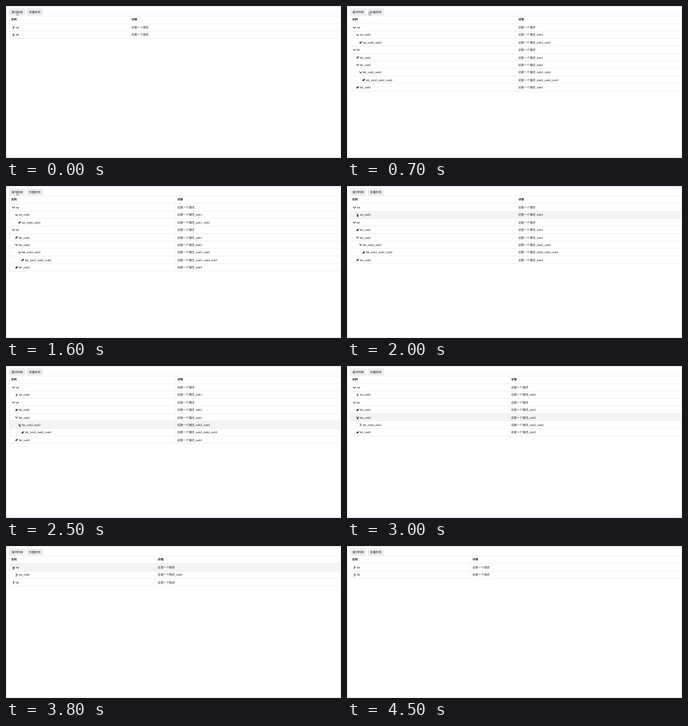
Write an HTML page that moves like this. It is 419x190 px and loops after 4.6 s.

```html
<!DOCTYPE html>
<html lang="zh-CN">
<head>
<meta charset="utf-8">
<style>
html, body { margin: 0; width: 100%; height: 100%; overflow: hidden; background: #fff; }
svg { display: block; width: 100%; height: 100%; }
text { font: 14px "Liberation Sans", "Noto Sans CJK SC", "Noto Sans CJK", sans-serif; fill: #1a1a1a; text-rendering: geometricPrecision; }
.head { font-weight: bold; }
</style>
</head>
<body>
<svg id="stage" viewBox="0 0 419 190" preserveAspectRatio="none"></svg>
<script>
const LOOP = 4600, STEP = 100;
const LEFT = 4, WIDTH = 414.5, HEAD = 12.2, TOP = 21.9, ROW = 9.36, INDENT = 3.8;
const DESC = '这是一个描述';
const NODES = ['aa', 'aa_sub1', 'aa_sub1_sub2', 'bb', 'bb_sub1', 'bb_sub2',
  'bb_sub2_sub2', 'bb_sub2_sub2_sub2', 'bb_sub3'];
const PARENTS = NODES.filter(n => NODES.some(m => m.startsWith(n + '_')));
const SPOTS = { expand: [13.8, 7.8], collapse: [32.8, 7.8], leave: [430, 200] };

// What the cursor does, and when; a node name closes that node.
const CLICKS = [
  [100, 'expand'], [1000, 'collapse'], [1500, 'expand'],
  [1900, 'aa_sub1'], [2600, 'bb_sub2_sub2'], [3100, 'bb_sub2'],
  [3400, 'bb'], [3900, 'aa'], [4500, 'leave']
];

const stage = document.getElementById('stage');
const depth = n => n.split('_').length - 1;
const rowsOf = open => NODES.filter(n => PARENTS.every(p => !n.startsWith(p + '_') || open.has(p)));

function openAt(t) {
  let open = new Set();
  for (const [time, action] of CLICKS) {
    if (time > t) break;
    if (action === 'expand') open = new Set(PARENTS);
    else if (action === 'collapse') open.clear();
    else open.delete(action);
  }
  return open;
}

function spot([time, action]) {
  if (SPOTS[action]) return SPOTS[action];
  const row = rowsOf(openAt(time)).indexOf(action);
  return [8.5 + depth(action) * INDENT, TOP + (row + .4) * ROW];
}

// Rest after a click, glide to the next place, rest again.
function cursorAt(t) {
  const i = CLICKS.findIndex(c => c[0] > t);
  if (i < 0) return SPOTS.leave;
  const to = CLICKS[i], from = CLICKS[i - 1] || [0, 'expand'];
  const part = (t - from[0]) / (to[0] - from[0]);
  const k = Math.min(1, Math.max(0, (part - .4) / .4)), ease = k * k * (3 - 2 * k);
  const a = spot(from), b = spot(to);
  return a.map((v, j) => v + (b[j] - v) * ease);
}

// Columns share the table width in proportion to their widest content.
function columnX(level) {
  const name = 58.7 + 53.2 * level, desc = 103 + 38.1 * level;
  return LEFT + 2.5 + WIDTH * name / (name + desc);
}

const rect = (x, y, w, h, fill, extra = '') =>
  `<rect x="${x}" y="${y}" width="${w}" height="${h}" fill="${fill}" ${extra}/>`;
const line = (x, y, w, h) => rect(x, y, w, h, '#e9e9e9');
const rule = y => line(LEFT, y - .25, WIDTH, .5);
const label = (x, y, s, cls = '') =>
  `<text class="${cls}" transform="translate(${x} ${y + 1.25}) scale(.2536)">${s}</text>`;
const shape = (x, y, d, style) => `<path transform="translate(${x} ${y})" d="${d}" ${style}/>`;
const button = (x, s) => rect(x, 3.1, 20.2, 8.6, '#eee', 'rx=".6"') + label(x + 3, 7.6, s);

function icon(x, y, node, open) {
  const d = !PARENTS.includes(node) ? 'M-1.3 1.2L1.1-1.2M-.6 1.3L1.4-.6M-1.2 .2L-.2-.8'
    : open.has(node) ? 'M-1.6-.8L0 .7L1.6-.8' : 'M-.8-1.6L.7 0L-.8 1.6';
  return shape(x, y, d, 'fill="none" stroke="#1a1a1a" stroke-width="1"');
}

function cursor(x, y, hand) {
  return hand
    ? shape(x, y, 'M-.2 0H.5V1.3L2 1.8V3L1.6 4H0L-.9 2.5L-.2 2.3Z',
        'fill="#fff" stroke="#333" stroke-width=".4"')
    : shape(x, y, 'M0 0V3.6L.8 2.9L1.4 4.2L2 3.9L1.5 2.7H2.5Z',
        'fill="#111" stroke="#fff" stroke-width=".3"');
}

function draw(t) {
  const open = openAt(t), rows = rowsOf(open);
  const col = columnX(Math.max(...rows.map(depth)));
  const [cx, cy] = cursorAt(t);
  const hover = Math.floor((cy - TOP) / ROW);
  const bottom = TOP + rows.length * ROW;

  let out = rect(.5, .5, 418, 189, '#fff', 'stroke="#e6e6e6" stroke-width=".8"');
  out += button(4.1, '展开所有') + button(26, '折叠所有') + rule(HEAD + .25);
  out += label(6.5, 17, '名称', 'head') + label(col, 17, '详情', 'head');
  rows.forEach((n, i) => {
    const y = TOP + i * ROW, mid = y + ROW / 2 + .3, x = 9.5 + depth(n) * INDENT;
    if (i === hover) out += rect(LEFT, y, WIDTH, ROW, '#f4f4f4');
    out += rule(y) + icon(x, mid, n, open);
    out += label(x + 2.9, mid, n) + label(col, mid, DESC + n.slice(2));
  });
  out += rule(bottom);
  for (const x of [LEFT, col - 2.5]) out += line(x, HEAD, .4, bottom - HEAD);
  stage.innerHTML = out + cursor(cx, cy, cy < HEAD);
}

let last = -1;
function tick(now) {
  const t = Math.floor(now % LOOP / STEP) * STEP;
  if (t !== last) draw(last = t);
  requestAnimationFrame(tick);
}
draw(0);
requestAnimationFrame(tick);
</script>
</body>
</html>
```
